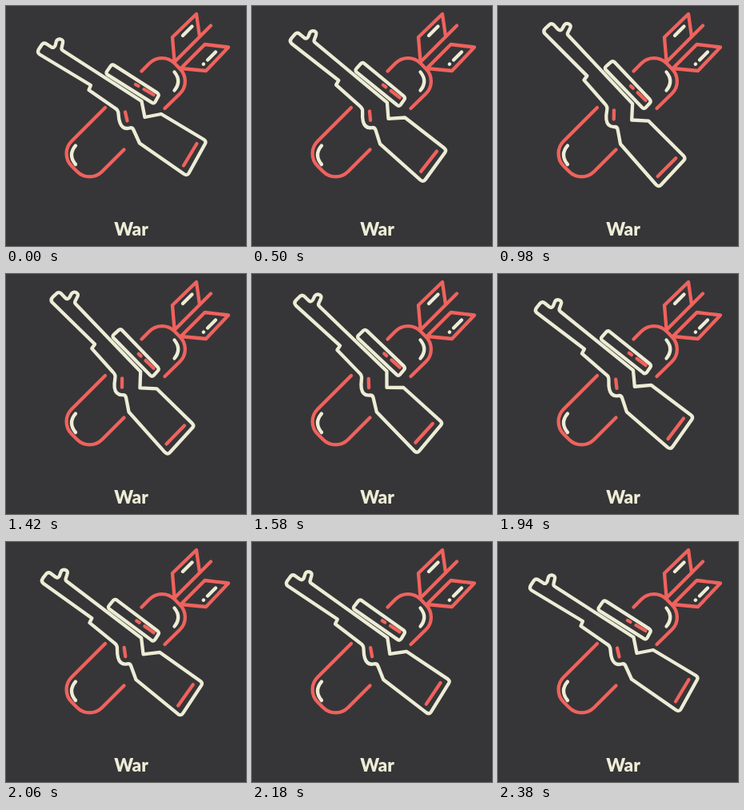
Recreate the animation shown at these times as an HTML page. Size 300 px wide and 300 px high, loop 8000 ms.

```html
<!DOCTYPE html>
<html lang="en">
<head>
<meta charset="utf-8">
<title>War</title>
<style>
  html, body { margin: 0; width: 100%; height: 100%; overflow: hidden; background: #363638; }
  svg { display: block; width: 100vw; height: 100vh; fill: none; stroke-width: 4.3; stroke-linecap: round; stroke-linejoin: round; }
  .red { stroke: #f0625d; }
  .cream { stroke: #edecd6; }
  text { font: 900 22.5px Lato, sans-serif; fill: #edecd6; text-anchor: middle; }
</style>
</head>
<body>
<svg viewBox="0 0 300 300">
  <!-- bomb -->
  <g class="red">
    <path d="M124 127L82 169A22 22 0 0 0 82 200L89 207A22 22 0 0 0 120 207L147.500 179.500"/>
    <path d="M169.500 81.500L179.400 71.600A22 22 0 0 1 210.600 71.600L217.400 78.400A22 22 0 0 1 217.400 109.600L198.500 128"/>
    <path d="M256 24.500L210.600 70L208 39L238 10L242 38"/>
    <path d="M218.500 78L248.500 48L278 51.500L250 81L218.500 78"/>
  </g>
  <g class="cream">
    <path d="M210.500 82.500Q220 94 210.500 105.500M87 174.500Q77 186 87 198"/>
    <path d="M221 37L232.500 25.500M246.800 72.800L247 72.600M252 67.500L262 57.500"/>
  </g>

  <!-- rifle -->
  <g id="rifle">
    <g class="cream">
      <path d="M41 54L45 48Q47 45.500 50 47L57 51.500Q60 53 61.500 49.500L63 44Q64.500 41 68 41.500Q72 42.500 71 46L69.500 52.500Q69 54.500 71.500 56L169.500 119L173.500 139L194 135L247.500 167Q250.500 169 249 172L228.500 209Q226.500 212.500 222.500 210L167 171.500L159.500 155Q158 151.500 154.500 152.500Q146 155 142.500 146Q141 142 140.500 135Q140.500 130 136 127.500L103.500 105L106 99L42 60.500Q38.500 58 41 54Z"/>
      <path d="M135.200 74.100L189.200 108.600Q191.700 110.600 190.200 113.100L186.700 119.600Q184.700 122.600 182.200 120.600L127.200 86.100Q124.200 84.100 126.200 81.600L130.700 75.100Q132.700 72.600 135.200 74.100Z"/>
    </g>
    <path class="red" d="M162 98L165.500 100M172.500 104L184.500 111M149 132.500L151.500 143.500M238.500 172L222 199.500"/>
  </g>

  <!-- muzzle flash -->
  <path id="flash" class="red" d="M31 27H44M58 3V16M39 8L49 18"/>

  <text x="156.500" y="286.500">War</text>
</svg>
<script>
  const rifle = document.getElementById('rifle');
  const flash = document.getElementById('flash');
  const LOOP = 8000, STEP = 40, KICK = 14;

  // Fast kick, hold, then an even return over one second
  function recoil(t) {
    if (t < 500 || t >= 2380) return 0;
    if (t < 540) return 0.5;
    if (t < 1420) return 1;
    return 1 - Math.floor((t - 1380) / STEP) * STEP / 1000;
  }

  function draw(now) {
    const t = now % LOOP;
    rifle.setAttribute('transform', `rotate(${KICK * recoil(t)} 156 115)`);
    flash.style.display = t >= 540 && t < 980 ? '' : 'none';
  }

  const start = performance.now();
  function tick() {
    draw(performance.now() - start);
    requestAnimationFrame(tick);
  }
  tick();
</script>
</body>
</html>
```
